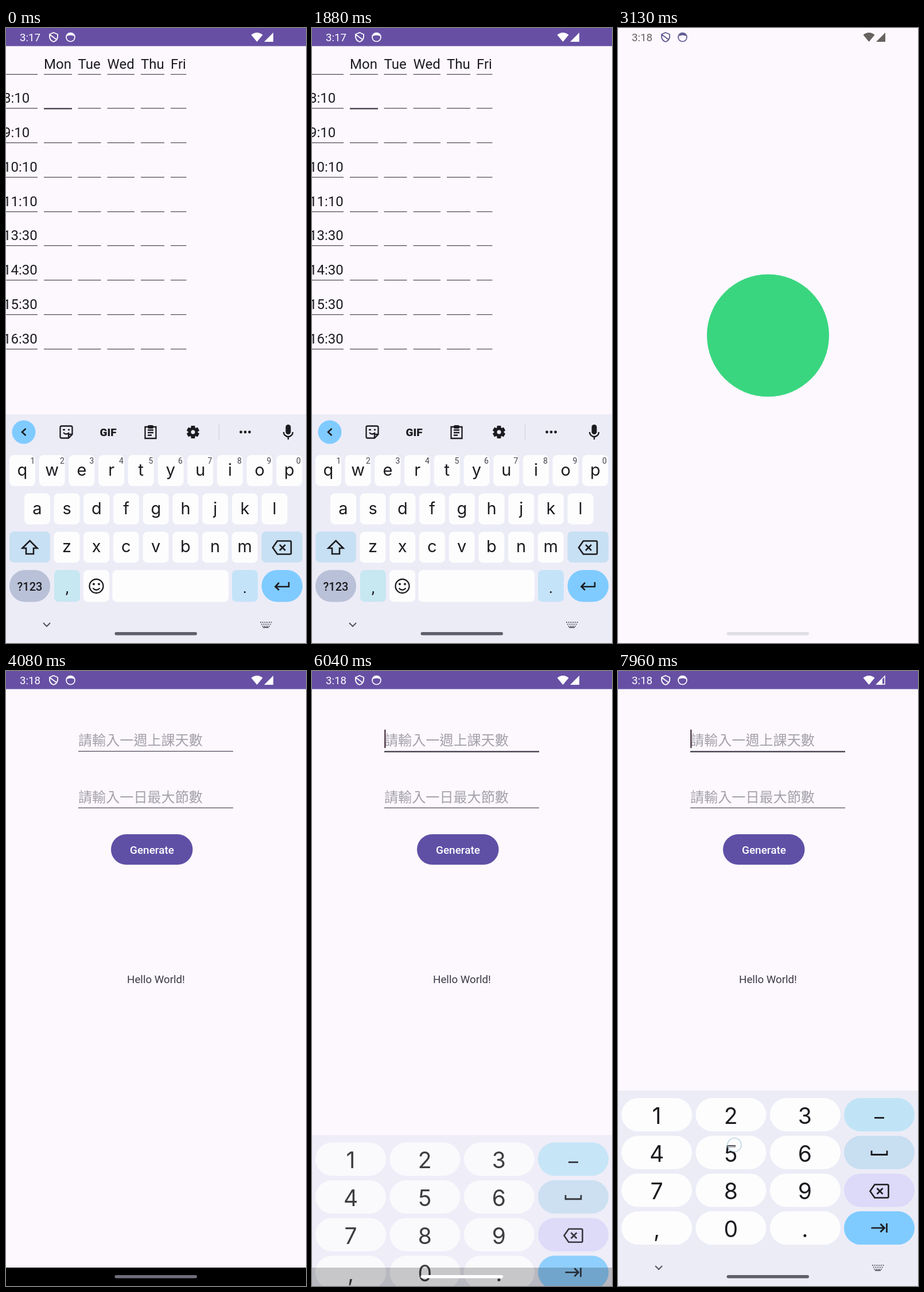
An HTML page with a canvas that plays this animation: 523 by 1070 pixels, repeating every 8000 ms.

```html
<!DOCTYPE html>
<html lang="en">
<head>
<meta charset="utf-8">
<title>Timetable app</title>
<style>
html, body { margin: 0; width: 100%; height: 100%; overflow: hidden; background: #fef7ff; }
canvas { display: block; width: 523px; height: 1070px; }
</style>
</head>
<body>
<canvas id="stage" width="523" height="1070"></canvas>
<script>
const LOOP = 8000, W = 523, H = 1070;
const HOME = 2750, OPEN = 2790, READY = 3750, FOCUS = 5800, SLIDE = 5880, TOUCH = 7700;
const PAPER = '#fdf8fe', INK = '#1c1b1f', PURPLE = '#6750a4', BOARD = '#ececf7';
const KEY = '#fdfdfe', SOFT = '#c8e0f3', BLUE = '#7fcbff';
const ROBOTO = 'Roboto, sans-serif', KEYS = 'Inter, sans-serif';
const CJK = '"Noto Sans CJK TC", "Noto Sans CJK", sans-serif';
const c = document.getElementById('stage').getContext('2d');
const clamp = v => Math.max(0, Math.min(1, v));

function rect(x, y, w, h, color, r = 0) {
  c.fillStyle = color;
  c.beginPath();
  c.roundRect(x, y, w, h, r);
  c.fill();
}
function disc(x, y, r, color) {
  c.fillStyle = color;
  c.beginPath();
  c.arc(x, y, r, 0, 7);
  c.fill();
}
function text(s, x, y, size, color = INK, align = 'left', weight = 400, family = ROBOTO) {
  c.font = `${weight} ${size}px ${family}`;
  c.textAlign = align;
  c.fillStyle = color;
  c.fillText(s, x, y);
}
// Path centred on x, y: stroked when a width is given, otherwise filled.
function icon(d, x, y, color = INK, width = 0) {
  c.save();
  c.translate(x, y);
  c.fillStyle = c.strokeStyle = color;
  c.lineWidth = width;
  width ? c.stroke(new Path2D(d)) : c.fill(new Path2D(d));
  c.restore();
}

function statusBar(time, color, marks = color, hollow = false) {
  text(time, 24, 23, 18.7, color);
  icon('M0-8L7-5V0Q6 6 0 8Q-6 6-7 0V-5ZM-6-4L5 4', 83, 16, marks, 1.8);
  icon('M7.5 0A7.5 7.5 0 1 1-7.5 0A7.5 7.5 0 1 1 7.5 0', 112.5, 16, marks, 1.7);
  icon('M-6-2Q0-5 6-2L5-5Q0-9-5-5Z', 112.5, 16, marks);
  icon('M0 8L-10-4Q0-12 10-4Z', 437.5, 16, color);
  if (hollow) {
    icon('M-7 7H7V-7Z', 458, 16, color, 1.5);
    icon('M-8 8H3V-3Z', 458, 16, color);
  } else icon('M-8 8H8V-8Z', 458, 16, color);
}
function appBar(time, hollow) {
  rect(0, 0, W, H, PAPER);
  rect(0, 0, W, 31.5, PURPLE);
  statusBar(time, '#fff', '#fff', hollow);
}
const handle = color => rect(189.5, 1051, 143.5, 5.5, color, 2.75);

function backspace(x, y) {
  icon('M-16 0L-8-11.5H14Q16-11.5 16-9.5V9.5Q16 11.5 14 11.5H-8ZM-4-5L6 5M6-5L-4 5', x, y, INK, 2.6);
}
function boardFooter() {
  icon('M-6-3L0 3L6-3', 71, 1038, '#55555f', 2);
  for (let row = 0; row < 3; row++)
    for (let i = 0; i < 6 - row; i++) rect(443 + row * 1.8 + i * 3.7, 1033 + row * 3.5, 2, 2, '#66666f');
  rect(448, 1042, 10, 2, '#66666f');
}

function toolbar() {
  const y = 703;
  disc(31, y, 20.5, BLUE);
  icon('M3.5-6L-3 0L3.5 6', 31, y, INK, 2.6);
  icon('M-10.5-8Q-10.5-10.5-8-10.5H8Q10.5-10.5 10.5-8V4L4 10.5H-8Q-10.5 10.5-10.5 8ZM10 4H4V10M-5 1Q0 6 5 1M-6-4H-2M3-4H6', 105, y, INK, 2.3);
  text('GIF', 178, 710, 19, INK, 'center', 900);
  icon('M-9.5-9H9.5V11H-9.5ZM-5-3.5H5M-5 1H5M-5 5.5H2', 252, y, INK, 2.3);
  rect(247, 691, 10, 6, INK, 2);
  c.save();
  c.translate(326, y);
  for (let i = 0; i < 6; i++) {
    c.rotate(Math.PI / 3);
    rect(-3.5, -11, 7, 6, INK, 1);
  }
  c.restore();
  icon('M6 0A6 6 0 1 1-6 0A6 6 0 1 1 6 0', 326, y, INK, 5);
  rect(371, 689, 1, 28, '#cfd0da');
  for (const x of [409.5, 417, 424.5]) disc(x, y, 2.4, INK);
  rect(487.5, 690, 9, 17, INK, 4.5);
  icon('M-8 0A8 8 0 0 0 8 0M0 8V13', 492, y, INK, 2.4);
}

function letterKey(ch, x, row) {
  const y = 743 + row * 66.7;
  rect(x - 22.5, y, 45, 54, KEY, 8);
  text(ch, x, y + 36, 29, INK, 'center', 400, KEYS);
}
function letterBoard() {
  rect(0, 672, W, 398, BOARD);
  toolbar();
  ['qwertyuiop', 'asdfghjkl', 'zxcvbnm'].forEach((keys, row) => {
    const left = [28.5, 54.5, 106][row];
    [...keys].forEach((ch, i) => letterKey(ch, left + i * 51.7, row));
  });
  for (let i = 0; i < 10; i++) text((i + 1) % 10, 46.5 + i * 51.5, 758, 14, '#44444c', 'center');
  rect(6, 876, 71, 54, SOFT, 8);
  icon('M0-12L13 1H6.5V11H-6.5V1H-13Z', 41.5, 904, INK, 2.6);
  rect(445.5, 876, 71.5, 54, SOFT, 8);
  backspace(481, 904);
  rect(6, 943, 71, 55.5, '#b9c1d8', 27);
  text('?123', 41.5, 979, 20, INK, 'center', 500);
  rect(84, 943, 45, 55.5, '#c7e7f1', 8);
  text(',', 106.5, 983, 28, INK, 'center');
  rect(135, 943, 45, 55.5, KEY, 8);
  icon('M12 0A12 12 0 1 1-12 0A12 12 0 1 1 12 0M-6 3.5Q0 10 6 3.5', 157.5, 971, INK, 2.3);
  disc(153, 967.5, 2, INK);
  disc(162, 967.5, 2, INK);
  rect(185.5, 943, 202.5, 55.5, KEY, 8);
  rect(394, 943, 45, 55.5, '#c5e3f8', 8);
  text('.', 416.5, 983, 28, INK, 'center');
  rect(445.5, 943, 71.5, 55.5, BLUE, 27.5);
  icon('M12-7V1H-11M-5-6L-11.5 1L-5 7', 481, 971, INK, 2.6);
  boardFooter();
}

function numberBoard() {
  rect(0, 730, W, 340, BOARD);
  ['123', '456', '789', ',0.'].forEach((keys, row) => {
    const y = 743 + row * 65.7;
    [...keys].forEach((ch, i) => {
      rect(6 + i * 129.4, y, 123, 58, KEY, 29);
      text(ch, 67.5 + i * 129.2, y + 45, 39, INK, 'center', 400, KEYS);
    });
    rect(394, y, 123, 58, ['#c0e4f6', '#c8def1', '#dcd9f9', BLUE][row], 29);
  });
  rect(447, 776, 17, 2.8, INK);
  icon('M-13.5-4V3H13.5V-4', 455.5, 838.5, INK, 2.8);
  backspace(455.5, 905);
  icon('M-14 0H8M2-7L9 0L2 7M13-8V8', 455.5, 969, INK, 2.7);
  boardFooter();
}

function timetable() {
  appBar('3:17');
  const cols = [['', -5, 60], ['Mon', 66, 49], ['Tue', 125.5, 40], ['Wed', 176.5, 47.5], ['Thu', 235, 41], ['Fri', 287, 27.5]];
  const hours = ['', '8:10', '9:10', '10:10', '11:10', '13:30', '14:30', '15:30', '16:30'];
  hours.forEach((hour, row) => {
    const y = row * 59.75;
    text(hour, -5, 70.5 + y, 24, INK);
    cols.forEach(([day, x, w], i) => {
      if (!row) text(day, x, 70.5, 24, INK);
      const focused = row == 1 && i == 1;
      rect(x, Math.round(79.5 + y), w, focused ? 2.4 : 1.2, '#4f4a57');
    });
  });
  letterBoard();
  handle('#5f5e6b');
}

function wallpaper() {
  rect(0, 0, W, H, '#05050c');
  // The petal turns from grey through white to blue, square to its lower edge.
  const g = c.createLinearGradient(0, 0, 147, 312);
  [[0, '#8a8a88'], [.18, '#cfcfcc'], [.5, '#d6d7db'], [.72, '#a9bbea'], [.92, '#7198e4'], [1, '#86a8ea']]
    .forEach(([at, color]) => g.addColorStop(at, color));
  c.save();
  c.filter = 'blur(3px)';
  icon('M-20-20H488Q494 30 470 62Q475 130 466 158Q440 190 408 202Q386 203 368 195Q330 209 290 225Q268 270 245 288Q130 352 60 373Q25 382-20 382Z', 0, 0, g);
  c.restore();
  icon('M488 0L497 55Q503 103 524 109', 0, 0, '#dcdcde', 5);
  icon('M490 725Q420 820 300 935', 0, 0, '#17171d', 2);
}
function homeScreen() {
  wallpaper();
  text('Tue, Jan 9', 51, 90, 25.5, '#fff');
  ['#fff', '#fff', '#35cf80', '#e58b62', '#5a8ae8'].forEach((color, i) => disc(67 + i * 97.3, 858.5, 34.7, color));
  disc(67, 858.5, 18, '#4285f4');
  disc(164.3, 858.5, 21, '#6d9ef5');
  rect(28, 938.5, 466, 68.5, '#fff', 34.25);
  [[66, 16], [392, 14], [456.5, 16]].forEach(([x, r]) => disc(x, 972.5, r, '#4285f4'));
}
function splash() {
  // The sheet is cut out under the disc so both fade in as one layer.
  c.fillStyle = PAPER;
  c.beginPath();
  c.rect(0, 0, W, H);
  c.arc(261.5, 535, 106, 0, 7);
  c.fill('evenodd');
  disc(261.5, 535, 106.5, '#3ad67f');
}
function launch(t) {
  const p = clamp((t - OPEN) / 300);
  const scale = .85 + .15 * (p < .5 ? 3.2 * p * p : 1 - .8 * (1 - p) ** 2);
  if (p < 1) homeScreen();
  c.save();
  c.globalAlpha = clamp((t - OPEN) / 146);
  c.translate(W / 2, H / 2);
  c.scale(scale, scale);
  c.translate(-W / 2, -H / 2);
  splash();
  c.restore();
  if (t < OPEN) statusBar('3:18', '#fff');
  else statusBar('3:18', '#65625f', '#5d5791');
  handle(p < 1 ? '#f8f6f4' : '#dedee4');
}

function field(hint, y, focused) {
  text(hint, 126, y - 10.5, 24.1, '#a3a0a9', 'left', 400, CJK);
  rect(126, y - .5, 270, focused ? 2.5 : 1.3, '#4f4a57');
}
function setup(t) {
  const p = clamp((t - SLIDE) / 360), focused = t >= FOCUS;
  appBar('3:18', t >= 6900);
  field('請輸入一週上課天數', 139.5, focused);
  field('請輸入一日最大節數', 238, false);
  if (focused && (t - FOCUS) % 1000 < 500) rect(126, 102, 2.6, 32, '#5c4854');
  rect(183, 284, 142.5, 53, '#5f50a6', 26.5);
  text('Generate', 254.5, 317.5, 19, '#fff', 'center', 500);
  text('Hello World!', 261.5, 543, 18.7, '#3b3945', 'center');
  rect(0, 1038, W, 32, `rgba(0,0,0,${(1 - p) ** 2.7})`);
  if (p > 0) {
    c.save();
    c.globalAlpha = clamp(p * 1.9);
    c.translate(0, 340 * (1 - p) ** 2.5);
    numberBoard();
    c.restore();
    rect(0, 1038, W, 32, `rgba(0,0,0,${(1 - p) ** 2.7})`);
  }
  handle(p == 0 ? '#716e7c' : p < 1 ? '#fff' : '#5f5e6b');
  if (t >= TOUCH) {
    rect(192, 826, 12, 3, '#a6a6ac');
    icon('M12 0A12 12 0 1 1-12 0A12 12 0 1 1 12 0', 203, 824.5, '#9fc3d6', 1.1);
  }
}

function draw() {
  const t = performance.now() % LOOP;
  if (t < HOME) timetable();
  else if (t < READY) launch(t);
  else setup(t);
  requestAnimationFrame(draw);
}
draw();
</script>
</body>
</html>
```
